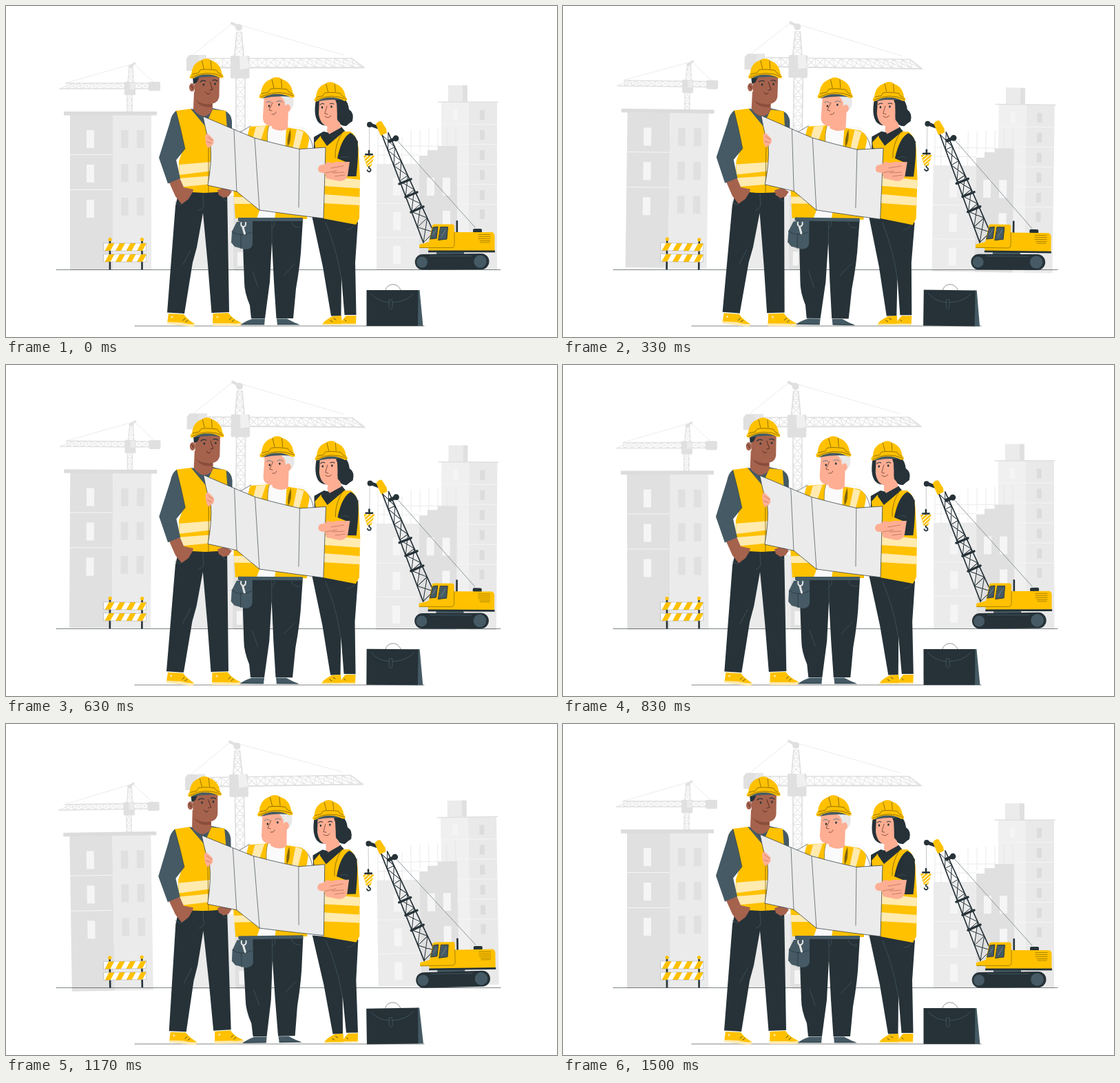
These frames come from a looping animation (800x480 px, 1540 ms). An HTML page:

```html
<!DOCTYPE html>
<html lang="en">
<head>
<meta charset="utf-8">
<title>Construction team</title>
<style>
html, body { margin: 0; width: 100%; height: 100%; overflow: hidden; background: #fff; }
svg { display: block; width: 100vw; height: 100vh; }
</style>
</head>
<body>
<svg id="stage" viewBox="0 0 800 480"></svg>
<script>
const Y = '#ffc100', D = '#263238', S = '#455a64', CREAM = '#ffeab0';
const G1 = '#e0e0e0', G2 = '#ebebeb', G3 = '#f5f5f5';
const BROWN = '#a5624d', PEACH = '#fdae93';

const fill = (c, d) => `<path fill="${c}" d="${d}"/>`;
const line = (c, w, d) =>
  `<path fill="none" stroke="${c}" stroke-width="${w}" stroke-linecap="round" stroke-linejoin="round" d="${d}"/>`;
const rect = (c, x, y, w, h, r = 0) =>
  `<rect fill="${c}" x="${x}" y="${y}" width="${w}" height="${h}" rx="${r}"/>`;
const dot = (c, x, y, rx, ry = rx) =>
  `<ellipse fill="${c}" cx="${x}" cy="${y}" rx="${rx}" ry="${ry}"/>`;
const windows = (c, xs, ys, w, h) =>
  xs.map(x => ys.map(y => rect(c, x, y, w, h)).join('')).join('');
const range = n => [...Array(n).keys()];

// Lattice between two rails, each given as [x0, y0, x1, y1].
function truss(a, b, n, c, rail, web) {
  const at = (r, k) => `${(r[0] + (r[2] - r[0]) * k).toFixed(1)} ${(r[1] + (r[3] - r[1]) * k).toFixed(1)}`;
  const rails = [a, b].map(r => `M${at(r, 0)}L${at(r, 1)}`).join('');
  const cells = range(n).map(i => {
    const p = i / n, q = (i + 1) / n;
    return `M${at(a, p)}L${at(b, q)}M${at(b, p)}L${at(a, q)}L${at(b, q)}`;
  }).join('');
  return line(c, rail, rails) + line(c, web, cells);
}

function leftBlock() {
  return rect(G1, 93, 158, 62, 225) + rect(G2, 155, 158, 56, 225) +
    rect('#dcdcdc', 84, 153, 135, 5.5) +
    windows(G3, [117], [180, 230, 281], 11, 26) +
    windows(G1, [167, 190], [180, 229, 278], 10.5, 26) +
    line(G3, 1, 'M93 215.5H154M93 266.5H154');
}

function rightBlock() {
  const rods = range(9).map(i => `M${549 + i * 13} ${i < 3 ? 190 : 183 - i}V${i < 4 ? 229 : 212}`).join('');
  return rect(G2, 642, 115, 21, 24) + rect(G1, 663, 115, 7, 24) +
    rect('#f0f0f0', 632, 139, 40, 244) + rect('#e9e9e9', 672, 139, 41, 244) +
    rect(G1, 627, 138.5, 88, 1.5) +
    windows(G3, [649], [150], 7, 15) +
    windows('#dcdcdc', [688], [151, 180, 209, 238, 267, 295], 7, 14) +
    line(G3, 1, 'M632 171.5H713M655 200.5H713M655 229.5H713M655 258.5H713M655 287.5H713') +
    line('#e2e2e2', .7, rods + 'M540 180V229M540 203H627M540 216H600') +
    rect(G2, 538, 229, 62, 154) +
    fill(G1, 'M600 217H612V209H627V203H655V383H600z') +
    windows(G3, [611, 634], [249], 11, 26) + windows(G3, [634], [297], 11, 26) +
    windows(G3, [562], [249, 299, 348], 11, 26) +
    line(G3, 1, 'M538 286.5H600M538 335.5H600');
}

function smallCrane() {
  return line(G1, .6, 'M180 85L86 112M186 84L214 110') +
    truss([176, 110, 176, 153], [183, 110, 183, 153], 5, G1, 1.3, .9) +
    truss([177, 110, 179, 88], [185, 110, 184, 88], 3, G1, 1.2, .8) +
    truss([88, 112, 172, 112], [78, 120, 172, 120], 9, G1, 1.4, .9) +
    truss([188, 112, 207, 112], [188, 120, 207, 120], 2, G1, 1.4, .9) +
    line(G1, 3, 'M179 88L187 83') + dot(G1, 182, 87, 2.6) +
    rect(G1, 207, 110, 17, 13, 2) + rect(G1, 172, 110, 16, 19, 1) + rect(G2, 180, 111, 7, 10);
}

function bigCrane() {
  return line(G1, .6, 'M327 26L270 72M341 28L490 71') +
    truss([334, 104, 334, 383], [347, 104, 347, 383], 20, G1, 1.8, 1) +
    truss([332, 72, 335, 38], [345, 72, 342, 38], 3, G1, 1.8, 1) +
    truss([352, 76, 502, 76], [352, 89, 519, 89], 12, G1, 1.6, 1) +
    truss([288, 76, 328, 76], [288, 89, 328, 89], 3, G1, 1.6, 1) +
    line(G1, 1.8, 'M502 76L520 89.5H290') +
    line(G1, 4, 'M328 25L340 31') + dot(G1, 338, 31, 5) +
    fill(G1, 'M266 71H291V94H262V76z') + rect('#e6e6e6', 279, 71, 12, 18) +
    rect(G1, 326, 72, 27.5, 33, 2) + fill('#f0f0f0', 'M339 72H350L353.5 90L340 92z');
}

const scenery = () => bigCrane() +
  rect(G2, 252, 275, 78, 108) + rect(G1, 330, 275, 28, 108) + rect(G3, 336, 357, 8, 20) +
  smallCrane() + leftBlock() + rightBlock();

function barrier() {
  const board = y => {
    const bars = range(4).map(i => {
      const x = 144.5 + i * 15.5;
      return `M${x - 1} ${y + 11}L${x + 5} ${y}H${x + 13}L${x + 7} ${y + 11}z`;
    }).join('');
    return rect('#fff', 142, y, 61.5, 11) + fill(Y, bars) +
      line('#8c9296', .4, `M142 ${y}H203.5V${y + 11}H142z`);
  };
  return rect(D, 149.6, 339, 2.6, 43.5) + rect(D, 196.2, 339, 2.6, 43.5) +
    dot(Y, 151, 338.5, 2.6) + dot(Y, 197.5, 338.5, 2.6) + board(344) + board(360);
}

function digger() {
  return line('#77838a', .8, 'M567 194L681 321') + line('#b5b5b5', .7, 'M527.5 174V211') +
    truss([546, 187, 606, 343], [555, 184, 621, 328], 7, D, 1.7, 1) +
    line(D, 3.4, 'M571 258L588 251M580 277L597 270M588 299L606 291') +
    line(D, 5, 'M529 172L540 176') + dot(D, 528, 172, 4) +
    line(D, 5, 'M557 196L567 191.5') + dot(D, 566, 192, 4.4) +
    fill(Y, 'M537 172Q539 167 545 167L552 178L553 184L544 188z') +
    line(D, 2.6, 'M527 210V216') + rect(D, 521, 214, 12, 2.6, 1) +
    fill(Y, 'M519 217H535L530 233H524z') +
    line('#fff', 1.2, 'M521 221L525 217.5M522.5 225L531 217.5M524 229L534 220M526 232L532 226.5') +
    line(D, 1.8, 'M527 233V235Q531 237 529 239.5Q526 241.5 524.5 238') +
    rect(D, 653.5, 311, 2.6, 18, 1) + rect(D, 678, 323, 13, 6, 2) +
    rect(S, 625, 356, 40, 7) +
    fill(D, 'M605 360L690 359A11.5 11.5 0 0 1 690 382L605 382.5A11 11 0 0 1 605 360z') +
    line(S, .8, 'M616 362.5H676') +
    dot(S, 604, 371.5, 8) + dot(S, 688.5, 370.5, 9.3) +
    fill(Y, 'M600 351V346L614 342L619 318Q620 316.5 622 316.5H649Q651 317 651 320V328H706Q709 329 709.5 333V355H614L613 351z') +
    rect(D, 613, 354.5, 97, 2.8) +
    fill(S, 'M620 321L627 320L625 337L616 338zM631 320.5H641.5L640 338L628 339.5z') +
    line(D, .9, 'M620 321L627 320L625 337L616 338zM631 320.5H641.5L640 338L628 339.5z') +
    line('#8b999f', .7, 'M620 332L624 325M632 335L638 325') +
    line('#8a6a00', .7, 'M601 350.5H648Q651 350 651 346V328M686 331.5H703M686 334.5H703M686 337.5H703M688 340.5H703M689 343H702');
}

function briefcase() {
  return line('#777', .8, 'M551 412C554 401 569 401 573 412') +
    fill(S, 'M597 412H600.5L605.5 464H597z') + fill(D, 'M523.5 412H598.5L598 464H523.5z') +
    line(S, .8, 'M530 417Q540 429 557 430M561 430Q582 429 592 417M556.5 426H561V437.5L558.7 440L556.5 437.5z');
}

const hat = (x, y, s = 1) => `<g transform="translate(${x} ${y}) scale(${s})">` +
  fill(S, 'M-20 22H21V27.5Q0 25 -20 29.5z') +
  fill(Y, 'M-22 22C-21 9 -13 4 -7 2.5C-5 -.6 4 -.6 6 2.5C15 5 21 12 22 22Q25 25 24 28L20 28.5C9 21.5 -9 21.5 -19 28.5Q-25 31 -24.5 26z') +
  line('#6b5200', .7, 'M-21 23L-12 21L-9 16.5Q0 15 14 17L17 21L21 23M-22 27.5Q0 16 23 26M-7 3L-4 15M6 3L7 15') + '</g>';

const eyes = (x1, y1, x2, y2) => dot(D, x1, y1, 1.3, 1.7) + dot(D, x2, y2, 1.3, 1.7);

function tallMan() {
  return fill(D, 'M252 264Q285 274 321 266L324 444L298.5 445L293 375L286 300L277 350L271 372L259 446L234 444.5L246 290z') +
    line(S, .7, 'M286 272L287 289Q286 295 280 296M257 375L268 354M246 285L254 289M312 272Q314 281 321 283') +
    fill(Y, 'M236 446L258 447Q264 455 274 461Q275 465 270 464L234 460z') +
    fill(CREAM, 'M234 458L255 459Q265 462 274 461Q276 465 269 465L234 461z') +
    fill(Y, 'M300.5 446L323 445Q329 454 341 459Q343 463 339 463.5H300z') +
    fill(CREAM, 'M300 460L325 460Q333 461 341 459.5Q343 463.5 339 464H300z') +
    line(D, .8, 'M257 456L260 453M261 458L264 456M324 455L327 452M328 458L331 455') +
    dot(CREAM, 241, 451, 1.5) + dot(CREAM, 307, 451, 1.5) +
    fill(S, 'M299 148L318 152Q327 156 328 167V180L305 174zM268 149L290 152L301 148L296 176H280z') +
    fill(Y, 'M246 152L268 149L289 174L300 150L319 152L321 178V268Q287 274 256 268L250 262L251 225L258 205z') +
    fill(CREAM, 'M251.5 230L300 226V239L251 245zM250.5 250L300 246V258L250 263z') +
    line('#6b5200', .7, 'M294 185V270') +
    fill(BROWN, 'M273 124L300 136V151Q296 159 286 160Q275 156 272 149z') +
    fill('#8a4d3b', 'M275 136Q285 144 299 142L299 146Q283 149 275 136z') +
    fill(BROWN, 'M273 102H310L309.5 131Q308 142 295 142Q278 142 274 128z') +
    dot(BROWN, 270, 118, 4, 6) + fill(D, 'M271 103L282 101L277 111L272 113z') +
    eyes(287, 114, 303.5, 113) +
    line(D, 1.2, 'M282 110Q285 107 290 109M300 108Q304 106 307 109') +
    line('#3f211b', .8, 'M296 110L300 121L296 122M290 125Q293 130 296 126M268 116Q270 114 271 120') +
    hat(291.3, 76) +
    fill(BROWN, 'M237 256L252 249L258 263L272 266L271 270L265 280L255 287.5L246 276z') +
    fill(S, 'M247 152Q240 157 238 169L222 220L235 257.5L253 250L247 223L260 207L254 180z') +
    line(D, .5, 'M247 153L254 180L260 207L247 223') +
    fill(BROWN, 'M307 267L318 263L328 269L323 276L316 278L309 274z');
}

function woman() {
  return fill(D, 'M444.5 306L511 313L507 372L508.5 448H491.5L487 394L486.5 449.5H472L460 378z') +
    line(S, .7, 'M464 314Q478 348 484 380L487 396M506 318Q502 324 495 324') +
    fill(Y, 'M474 450L487 449L488 460L486 462L459 463Q460 457 474 450zM494 449H508.5L508 462H487Q486 457 494 449z') +
    fill(CREAM, 'M459 461H488L487 463H459zM487 460.5H508.5V462.5H487z') +
    line(D, .8, 'M471 456L474 458M476 453L479 455M492 455L494 457') +
    fill(D, 'M450 136Q446 158 453 168Q460 176 470 172L480 165Q486 175 494 174Q498 170 503 167Q506 155 498 150Q497 140 491 134z') +
    fill(D, 'M447 190L461 182L470 184L487 175L492 182L511 196V208H447z') +
    fill(PEACH, 'M467 168L482 160L487 177L470 187L466 181z') +
    fill(PEACH, 'M455 136H480L481 162Q477 174 467 174.5Q456 172 454 156z') +
    fill(D, 'M478 136L483 149Q480 157 481 165Q486 172 490 172L492 138z') +
    eyes(459, 147, 472.5, 146) +
    line(D, 1, 'M456 143Q459 140 462 142M470 142Q473 140 476 142') +
    line('#713f30', .8, 'M466 145L463 156L467 157M463 160Q468 164 472 159') +
    hat(471.5, 110, .97) +
    fill(Y, 'M448 198L457 188L466 202L489 182L500 182Q512 190 512 212L514 250L513 308L508 317Q486 313 460 308V212L449 206z') +
    fill(D, 'M460 183L469 186L487 176L492 181L466 203L457 190z') +
    line('#6b5200', .7, 'M489 182Q477 201 478 220') +
    fill(CREAM, 'M462 246L514 252V264.5L461 261zM461 273L514 277V289L461 286z') +
    fill(D, 'M500 184Q487 191 481 221L498 228L495 247H508.5Q513 208 510 196Q508 188 500 184z') +
    line(S, .6, 'M486 220Q492 217 498 220');
}

const armsFolded = () =>
  fill(PEACH, 'M468 231L479 226H499L496 246Q493 254 484 254L465 250L462 240z') +
  fill(PEACH, 'M466 226Q464 230 456 231Q452 234 453.5 239Q456 243 466 242L478 239V228z') +
  line('#a45f4b', .6, 'M464 242L480 239M472 235L490 232M474 242L491 241M478 247L492 245');

function oldMan() {
  return fill(D, 'M339 310H431L429 342Q428 370 421 410L419 432L417 453H392.5L389 400L386 342L383 400L376 453H356L354 434Q346 415 346 400L344 345z') +
    line(S, .7, 'M386 313V342M390 313Q391 320 386 322M404 390L419 374M358 385L366 408M414 313Q417 322 427 321') +
    fill(S, 'M358 453.5H376L375 462.5H341Q345 458 358 453.5zM393 453.5H408Q418 459 427 462.5H394z') +
    line('#26323880', .8, 'M341 461H375M394 461H424') +
    fill('#fafafa', 'M338 184L355 174H430Q444 184 447 198V208H340zM362 290H396V307H362z') +
    line(D, .6, 'M340 183L355 174M431 181Q443 188 446 206') +
    fill(Y, 'M354 175L382 173Q378 183 380 205H355L351 186zM407 176L430 180Q441 186 440 194L437 210H405zM330 264L369 294L364 308H333zM392 296L437 303V309H390z') +
    fill(CREAM, 'M363 175L377 173.5L368 200H356zM422 179L432 182L424 212H415zM331 277H346L358 287H331z') +
    line('#6b5200', .6, 'M382 173Q378 185 380 203') +
    fill('#80640a', 'M413 178Q407 192 409 204Q415 196 413 178z') +
    rect(S, 337, 307, 94, 5) +
    fill(PEACH, 'M386 165L410 148L409 178Q399 184 386 177z') +
    fill(PEACH, 'M375 129H410V152L406 168Q398 175 384 174Q372 172 373 160z') +
    fill('#e8e8e8', 'M398 130H416Q420 141 415 149L409 154L405 143Q406 137 398 130z') +
    dot(PEACH, 409, 148, 4, 5.5) +
    eyes(382, 145, 396.5, 143) +
    line('#8b8b8b', 1.3, 'M378 140Q381 137 385 140M393 139Q397 136 401 139') +
    line('#713f30', .8, 'M387 140L382 151L386 152M386 157Q391 158 392 154') +
    hat(393.3, 103, 1.05) +
    fill(S, 'M335 313L358 311V345Q357 353 347 353L332 349L327 343L328 327z') +
    line(D, .7, 'M328 327Q340 336 357 328M341 331V352') +
    line('#e6e6e6', 3, 'M344 321L346.5 330') +
    line('#e6e6e6', 2, 'M341.5 314Q340 319 344.5 320.5Q349 319 348 314') +
    paper();
}

function paper() {
  return `<g stroke-linejoin="round" stroke="${D}" stroke-width=".7">` +
    fill(G2, 'M286 160L331 179L361 191.5Q396 201 426 207.5L464 205L461 308L424 303.5L368 296L335 269L293 260Q299 226 297 204Q291 186 286 160z') + '</g>' +
    line(D, .6, 'M331 179L335 269M361 191.5L368 296M426 207.5L425 292') +
    fill(PEACH, 'M289 188Q292 183 296 188L301 193Q303 200 298 203L293 206L290 199z') +
    line('#a45f4b', .6, 'M293 190L300 195M292 197L298 199');
}

// Each part sways about its own centre.
const parts = [
  [395, 203, scenery],
  [0, 0, () => line(D, .6, 'M73 382.5H718') + line('#777', .9, 'M187 464H607'), true],
  [173, 359, barrier],
  [617, 275, digger],
  [564, 434, briefcase],
  [283, 270, tallMan],
  [480, 287, woman],
  [375, 284, oldMan],
  [480, 287, armsFolded]
];
const stage = document.getElementById('stage');
stage.innerHTML = parts.map(p => `<g>${p[2]()}</g>`).join('');

const LOOP = 1540, STEPS = 37, SWAY = 1500;
function sway(t) {
  const p = t / SWAY;
  return p < .25 ? 4 * p : p < .75 ? 2 - 4 * p : 4 * p - 4;
}
function draw(now) {
  const step = Math.floor((now % LOOP) / LOOP * STEPS);
  const angle = sway(step * 1000 / 24).toFixed(4);
  parts.forEach(([x, y, , still], i) => {
    if (!still) stage.children[i].setAttribute('transform', `rotate(${angle} ${x} ${y})`);
  });
}
const start = performance.now();
function tick() {
  draw(performance.now() - start);
  requestAnimationFrame(tick);
}
tick();
</script>
</body>
</html>
```
